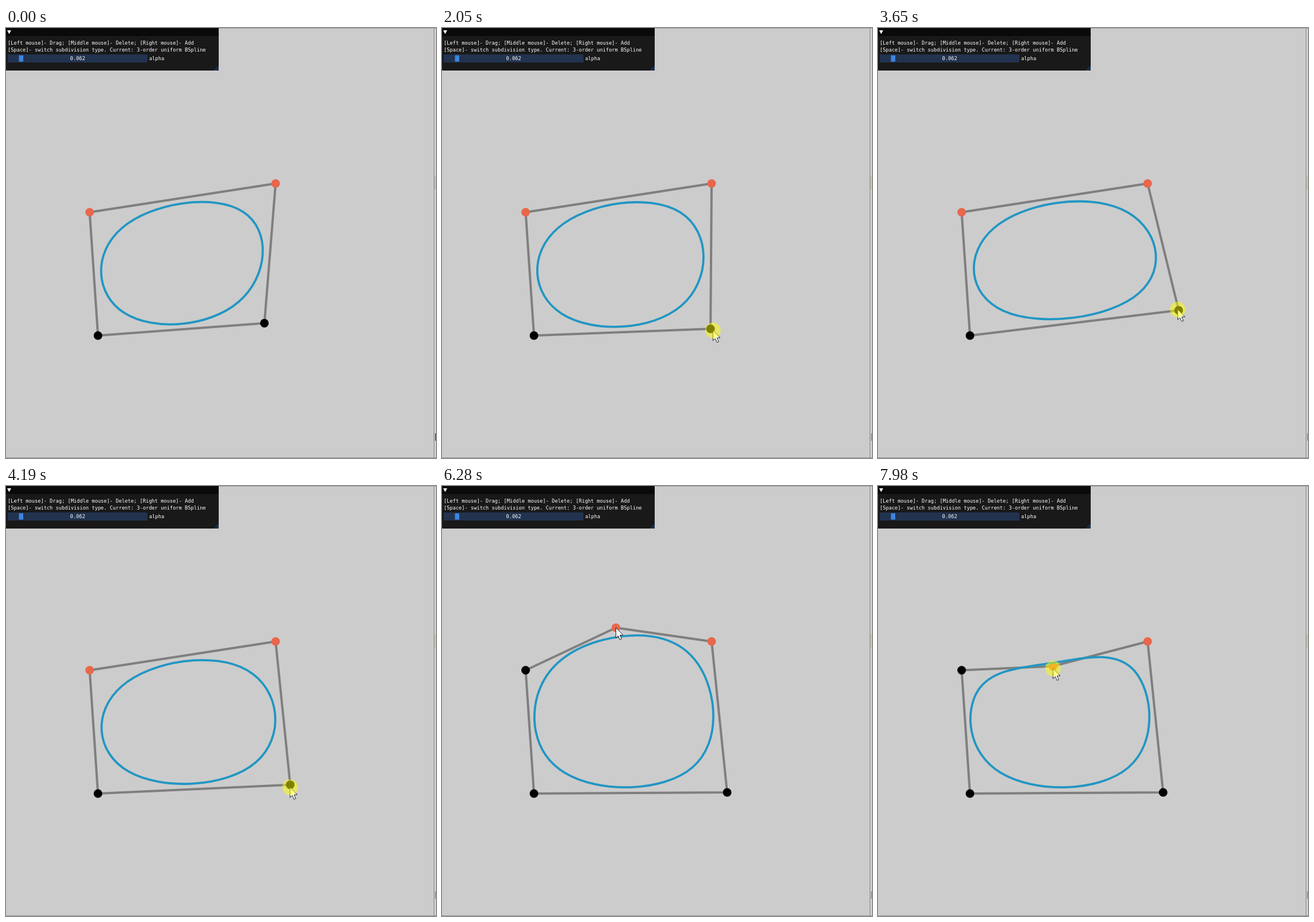
Recreate the animation shown at these times as an HTML page with a canvas. Size 748 px wide and 748 px high, loop 8 s.

```html
<!DOCTYPE html>
<html lang="en">
<head>
<meta charset="utf-8">
<title>B-spline editor</title>
<style>
  html, body { margin: 0; width: 100%; height: 100%; overflow: hidden; background: #ccc; }
  canvas { display: block; }
</style>
</head>
<body>
<canvas id="stage" width="748" height="748"></canvas>
<script>
const ctx = document.getElementById('stage').getContext('2d');
const SIZE = 748, LOOP = 8000;
const LAG = 45; // a dragged point trails the pointer by this many ms

const A = [145.5, 320.5], B = [469, 270.5], C = [449.5, 513.4], D = [160, 535];
const LOW = [517, 557], HIGH = [523, 491], REST = [496, 533];
const ADDED = [302.5, 246.5], DIPPED = [304.5, 319];

const DRAG_START = 1830, RELEASE = 4420, ADD_TIME = 6280, DIP_START = 7160;

// Pointer moves along Bezier curves; ease 1 is steady, more slows down at the end
const MOVES = [
  { from: 290, to: 1400, ease: 1.6, path: [[687, 748], [560, 600], [445, 410], C] },
  { from: DRAG_START, to: 2600, ease: 1.15, path: [C, [473, 525], [493, 542], LOW] },
  { from: 2700, to: 3500, ease: 1, path: [LOW, [535, 551], [540, 510], HIGH] },
  { from: 3620, to: 4290, ease: 1, path: [HIGH, [512, 480], [487, 515], REST] },
  { from: 4490, to: 5640, ease: 1.6, path: [REST, [402, 440], [370, 320], ADDED] },
  { from: DIP_START, to: LOOP, ease: 1, path: [ADDED, ADDED, DIPPED, DIPPED].map((p, i) => mix(ADDED, DIPPED, i / 3)) }
];
const PRESSES = [[1690, RELEASE], [5770, 5910], [7020, LOOP]];

function mix(p, q, w) {
  return [p[0] + (q[0] - p[0]) * w, p[1] + (q[1] - p[1]) * w];
}

function bezier(pts, u) {
  while (pts.length > 1) pts = pts.slice(1).map((p, i) => mix(pts[i], p, u));
  return pts[0];
}

function pointer(t) {
  const move = MOVES.filter(m => t >= m.from).pop() || MOVES[0];
  const u = Math.max(0, Math.min(1, (t - move.from) / (move.to - move.from)));
  return bezier(move.path, 1 - (1 - u) ** move.ease);
}

function controlPoints(t) {
  const corner = t < DRAG_START ? C : pointer(Math.min(t - LAG, RELEASE));
  const pts = [B, corner, D, A];
  if (t >= ADD_TIME) pts.push(pointer(t - LAG));
  return pts;
}

function rect(color, x, y, w, h) {
  ctx.fillStyle = color;
  ctx.fillRect(x, y, w, h);
}

function disc(color, [x, y], r) {
  ctx.fillStyle = color;
  ctx.beginPath();
  ctx.arc(x, y, r, 0, Math.PI * 2);
  ctx.fill();
}

function polygon(pts) {
  ctx.beginPath();
  pts.forEach(p => ctx.lineTo(...p));
  ctx.closePath();
}

function fillWith(color) {
  ctx.fillStyle = color;
  ctx.fill();
}

function strokeWith(color, width) {
  ctx.strokeStyle = color;
  ctx.lineWidth = width;
  ctx.stroke();
}

// Closed uniform cubic B-spline as Bezier pieces
function spline(pts) {
  const n = pts.length;
  const at = i => pts[(i + n) % n];
  const knot = i => mix(mix(at(i), at(i - 1), 1 / 3), mix(at(i), at(i + 1), 1 / 3), 0.5);
  ctx.beginPath();
  ctx.moveTo(...knot(0));
  for (let i = 0; i < n; i++) {
    ctx.bezierCurveTo(...mix(at(i), at(i + 1), 1 / 3), ...mix(at(i), at(i + 1), 2 / 3), ...knot(i + 1));
  }
  ctx.closePath();
}

function panel() {
  const w = 370, h = 74;
  rect('#191919', 0, 0, w, h);
  rect('#0a0a0a', 0, 0, w, 14);
  polygon([[2, 4], [9, 4], [5.5, 10.5]]);
  fillWith('#fff');
  polygon([[w, h - 9], [w, h], [w - 9, h]]);
  fillWith('#1c2f4a');
  rect('#22334f', 3, 46, 243, 14);
  rect('#3d85e0', 22.5, 47.5, 7.5, 11);

  ctx.font = '8.69px "DejaVu Sans Mono", monospace';
  ctx.fillStyle = '#fff';
  ctx.fillText('[Left mouse]- Drag; [Middle mouse]- Delete; [Right mouse]- Add', 3, 28.5);
  ctx.fillText('[Space]- switch subdivision type. Current: 3-order uniform BSpline', 3, 41.3);
  ctx.fillText('0.062', 111.5, 56.3);
  ctx.fillText('alpha', 249, 56.3);
}

function frameEdges(t) {
  const late = t >= 1400;
  rect('#cfcfcf', 745, 0, 3, SIZE);
  rect(late ? '#c6c6ae' : '#bdbdbd', 745, 257, 3, 24);
  rect(late ? '#8f8f5c' : '#444', 746.5, 705, 1.5, 13);
  rect('#868686', 744, 0, 1, SIZE);
  rect('#a0a0a0', 0, 0, SIZE, 1);
  rect('#909090', 0, 747, SIZE, 1);
}

function arrow([x, y]) {
  ctx.save();
  ctx.translate(x, y);
  polygon([[0, 0], [0, 17.8], [4, 14.2], [6.9, 20.8], [9.9, 19.5], [7, 13], [12.5, 12.7]]);
  fillWith('#fff');
  strokeWith('#222', 1);
  ctx.restore();
}

function draw(t) {
  rect('#ccc', 0, 0, SIZE, SIZE);
  frameEdges(t);

  const pts = controlPoints(t);
  ctx.lineJoin = 'round';
  polygon(pts);
  strokeWith('#7f7f7f', 4);
  pts.forEach((p, i) => disc(i === 0 || i === pts.length - 1 ? '#e8674b' : '#000', p, 7.5));
  spline(pts);
  strokeWith('#2196c3', 3.8);

  panel();

  if (t >= 300) {
    const tip = pointer(t);
    arrow(tip);
    if (PRESSES.some(([from, to]) => t >= from && t < to)) disc('rgba(255,255,0,0.5)', tip, 13.5);
  }
}

const start = performance.now();
function tick() {
  draw((performance.now() - start) % LOOP);
  requestAnimationFrame(tick);
}
tick();
</script>
</body>
</html>
```
